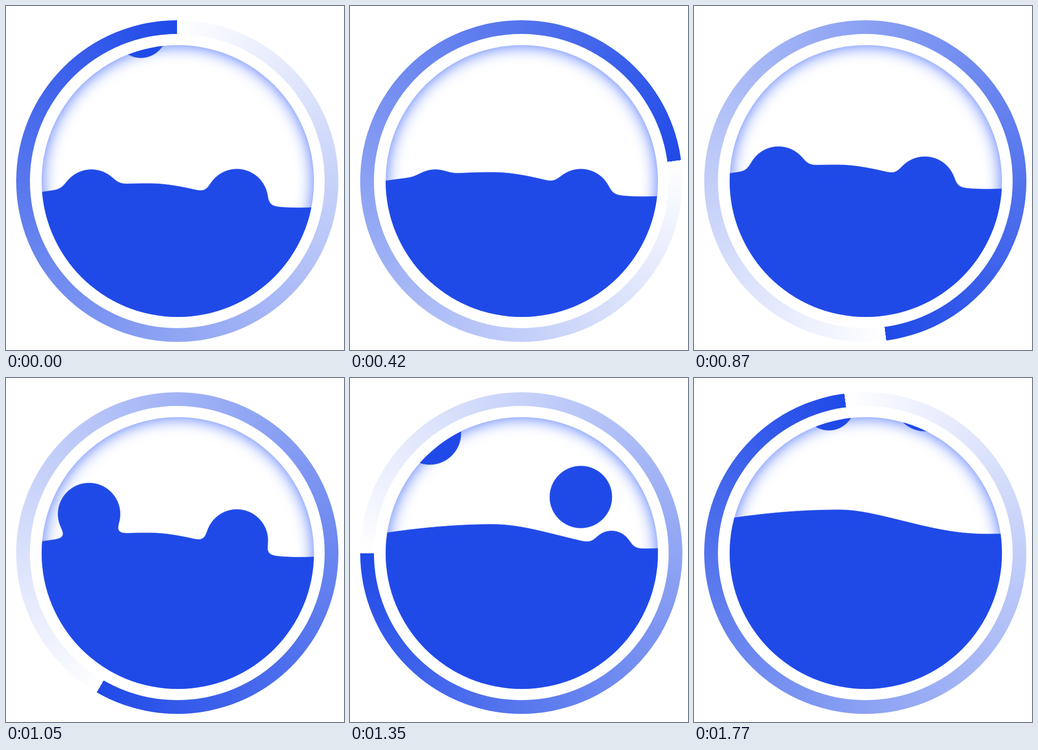
An HTML page that plays this animation: 664x677 px, repeating every 1.8 s.

```html
<!DOCTYPE html>
<html lang="en">
<head>
<meta charset="utf-8">
<title>Liquid loader</title>
<style>
  html, body { margin: 0; width: 100%; height: 100%; overflow: hidden; background: #fff; }
  div { position: absolute; border-radius: 50%; }
  #ring { left: 20px; top: 28px; width: 633px; height: 633px; }
  #gap { left: 47px; top: 55px; width: 579px; height: 579px; background: #fff; }
  #bowl { left: 70px; top: 77px; width: 535px; height: 535px; box-shadow: inset 0 0 32px #4a70ff; }
  svg { position: absolute; left: 0; top: 0; clip-path: circle(267.5px at 337.5px 344.5px); }
</style>
</head>
<body>
<div id="ring"></div>
<div id="gap"></div>
<div id="bowl"></div>
<svg width="664" height="677">
  <filter id="goo" filterUnits="userSpaceOnUse" x="0" y="0" width="664" height="677" color-interpolation-filters="sRGB">
    <feGaussianBlur stdDeviation="10"/>
    <feColorMatrix values="1 0 0 0 0  0 1 0 0 0  0 0 1 0 0  0 0 0 18 -7"/>
  </filter>
  <g id="liquid" filter="url(#goo)" fill="#204ae8">
    <path id="water" d="M0-17Q150-46 285-46C365-46 465 2 570 2Q610 2 664-2V500H0Z"/>
  </g>
</svg>
<script>
const LOOP = 1800, STEP = 30;
const ring = document.getElementById('ring');
const water = document.getElementById('water');
const liquid = document.getElementById('liquid');

// Water height at a few moments, straight lines between.
const levels = [[0, 397], [420, 375], [690, 368], [1200, 346], [LOOP, 305]];

// Each bubble leaves y = rest at its own speed; lean tilts its path.
const bubbles = [
  { x: 265, r: 50, rest: 627, speed: 160, lean: 0, lag: 1 },
  { x: 453.5, r: 60, rest: 382, speed: 94, lean: 0, lag: 0 },
  { x: 152.5, r: 60, rest: 383, speed: 174, lean: 0.04, lag: 0 },
  { x: 476.5, r: 40, rest: 557, speed: 137, lean: 0.11, lag: 0 }
];

for (const b of bubbles) {
  b.el = document.createElementNS('http://www.w3.org/2000/svg', 'circle');
  b.el.setAttribute('r', b.r);
  liquid.append(b.el);
}

const clamp = p => Math.min(1, Math.max(0, p));

function level(t) {
  const i = levels.findIndex(k => k[0] > t);
  const [t0, y0] = levels[i - 1], [t1, y1] = levels[i];
  return y0 + (y1 - y0) * (t - t0) / (t1 - t0);
}

// Two rises per loop: a quick one, then a slow one.
const rise = t => clamp(t < 810 ? (t - 420) / 420 : (t - 810) / 960);

// A short push off, then a growing pull upwards.
const climb = p => Math.sqrt(p) + 2.6 * p * p;

function draw(now) {
  const t = Math.floor(now % LOOP / STEP) * STEP;
  const turn = Math.floor(96 * t / LOOP) * 3.75;
  ring.style.background = `conic-gradient(from ${turn}deg, #fff, #204ae8)`;
  water.setAttribute('transform', `translate(0 ${level(t)})`);
  for (const { el, x, rest, speed, lean, lag } of bubbles) {
    const y = rest - speed * climb(rise((t - lag + LOOP) % LOOP));
    el.setAttribute('cx', x + lean * y);
    el.setAttribute('cy', y);
  }
}

const start = performance.now();
function tick() {
  draw(performance.now() - start);
  requestAnimationFrame(tick);
}
tick();
</script>
</body>
</html>
```
